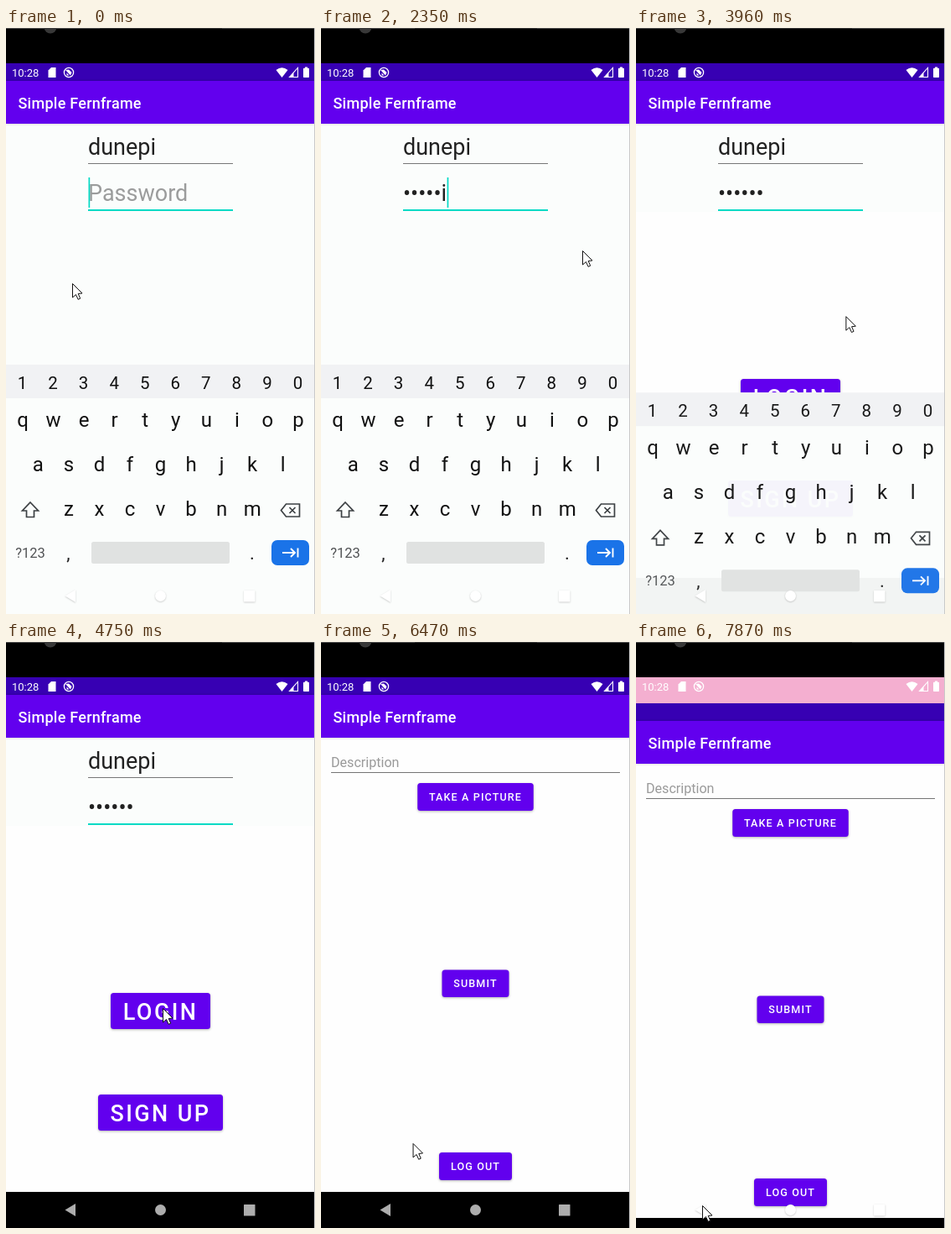
Recreate the animation shown at these times as an HTML page with a canvas. Size 369 by 698 pixels, loop 7.99 s.

```html
<!DOCTYPE html>
<html lang="en">
<head>
<meta charset="utf-8">
<title>Login demo</title>
<style>
html, body { margin: 0; width: 100%; height: 100%; overflow: hidden; background: #000; }
canvas { display: block; width: 369px; height: 698px; }
</style>
</head>
<body>
<canvas id="stage"></canvas>
<script>
const W = 369, H = 698, LOOP = 7990, STEP = 120;
const TOP = 42, BAR = 63, NAV = 655, MID_X = 184.5, MID_Y = 370;
const PURPLE = '#6200ee', DEEP = '#3700b3', TEAL = '#03dac5', PAPER = '#fefefe', INK = '#212121';
const USER = 'dunepi';
const FIELD_X = 98, FIELD_W = 173;
const KEY_GAP = 36.55, ROW_GAP = 53;
const HIDE_KEYBOARD = 3960, PRESS = 5000, OPEN = 5870, CLOSE = 7870;

const canvas = document.getElementById('stage');
const ctx = canvas.getContext('2d');
const ratio = window.devicePixelRatio || 1;
canvas.width = W * ratio;
canvas.height = H * ratio;

// Pointer strokes: each bends through a control point on its way to the next rest.
const home = [79, 304];
const strokes = [
  { start: 1870, end: 2350, bend: [170, 430], to: [312, 265] },
  { start: 2510, end: 2990, bend: [300, 620], to: [222, 213] },
  { start: 3540, end: 3820, bend: [227, 216], to: [232, 219] },
  { start: 3960, end: 4480, bend: [295, 580], to: [187, 436] },
  { start: 6110, end: 6590, bend: [213, 513], to: [53, 649] },
  { start: 6710, end: 7250, bend: [56, 705], to: [79, 671] }
];

// Stepped progress: already under way at start, complete at end.
function progress(t, start, end) {
  if (t < start) return 0;
  const done = Math.floor((t - start) / STEP) + 1;
  const total = Math.floor((end - start) / STEP) + 1;
  return Math.min(1, done / total);
}

function pointerAt(t) {
  let from = home;
  for (const { start, end, bend, to } of strokes) {
    const p = progress(t, start, end), q = 1 - p;
    if (p < 1) return from.map((v, i) => q * q * v + 2 * p * q * bend[i] + p * p * to[i]);
    from = to;
  }
  return from;
}

function keysTyped(t, start, count, interval) {
  return Math.max(0, Math.min(count, Math.floor((t - start) / interval) + 1));
}

function caretVisible(t) {
  const idle = Math.max(0, Math.min(t, 5240) - 1370);
  return Math.floor(idle / 482) % 2 === 0;
}

function rect(x, y, w, h, color, radius = 0) {
  ctx.fillStyle = color;
  ctx.beginPath();
  ctx.roundRect(x, y, w, h, radius);
  ctx.fill();
}

function disc(x, y, r, color) {
  ctx.fillStyle = color;
  ctx.beginPath();
  ctx.arc(x, y, r, 0, Math.PI * 2);
  ctx.fill();
}

function path(points, { fill, stroke, width = 1, close = true }) {
  ctx.beginPath();
  points.forEach(([x, y]) => ctx.lineTo(x, y));
  if (close) ctx.closePath();
  if (fill) { ctx.fillStyle = fill; ctx.fill(); }
  if (stroke) { ctx.strokeStyle = stroke; ctx.lineWidth = width; ctx.stroke(); }
}

function text(str, x, y, size, color, { weight = 400, spacing = 0, align = 'left' } = {}) {
  ctx.font = `${weight} ${size}px Roboto, sans-serif`;
  ctx.letterSpacing = spacing + 'px';
  ctx.textAlign = align;
  ctx.fillStyle = color;
  ctx.fillText(str, x, y);
  const { width } = ctx.measureText(str);
  ctx.letterSpacing = '0px';
  return width;
}

function group(draw) {
  ctx.save();
  draw();
  ctx.restore();
}

function clipped(x, y, w, h, draw) {
  group(() => {
    ctx.beginPath();
    ctx.roundRect(x, y, w, h, 0);
    ctx.clip();
    draw();
  });
}

function shadowed(alpha, blur, drop, draw) {
  group(() => {
    ctx.shadowColor = `rgba(0,0,0,${alpha})`;
    ctx.shadowBlur = blur;
    ctx.shadowOffsetY = drop;
    draw();
  });
}

function scaled(scale, draw) {
  group(() => {
    ctx.translate(MID_X, MID_Y);
    ctx.scale(scale, scale);
    ctx.translate(-MID_X, -MID_Y);
    draw();
  });
}

function button(label, y, w, h, size) {
  shadowed(.3, 3, 1, () => rect(MID_X - w / 2, y, w, h, PURPLE, 3.5));
  text(label, MID_X, y + h / 2 + size * .375, size, '#fff',
    { weight: 500, spacing: size * .0893, align: 'center' });
}

function appWindow(paper) {
  rect(0, TOP, W, NAV - TOP, paper);
  rect(0, TOP, W, BAR - TOP, DEEP);
  shadowed(.22, 3, 0, () => rect(0, BAR, W, 114 - BAR, PURPLE));
  text('Simple Fernframe', 14.5, 96, 18, '#fff', { weight: 500, spacing: .25 });
  rect(0, NAV, W, H - NAV + 10, '#000');
}

function passwordField(t) {
  const size = 27, baseline = 206;
  const count = keysTyped(t, 250, 2, STEP) + keysTyped(t, 880, 4, 160);
  const masked = t >= 2860 ? count : Math.max(0, count - 1);
  let x = FIELD_X;
  if (!count) text('Password', x, baseline, size, '#9b9c9c');
  x += text('•'.repeat(masked), x, baseline, size, INK);
  x += text(USER.slice(masked, count), x, baseline, size, INK);
  if (caretVisible(t)) rect(x + .5, 178, 1.7, 36, TEAL);
  rect(FIELD_X, 216, FIELD_W, 2, TEAL);
}

function loginScreen(t) {
  appWindow('#fbfdfc');
  if (t >= HIDE_KEYBOARD) rect(0, 219, W, NAV - 219, PAPER);
  text(USER, FIELD_X, 151, 27, INK);
  rect(FIELD_X, 161, FIELD_W, 1, '#777');
  passwordField(t);
  button('LOGIN', 418, 119, 43, 27);
  button('SIGN UP', 539, 149, 43, 27);

  const press = progress(t, PRESS, PRESS + 2 * STEP);
  if (press > 0 && press < 1) clipped(125, 418, 119, 43, () =>
    disc(187, 438, 100 * press, `rgba(255,255,255,${.35 * (1 - press)})`));
}

function postScreen() {
  const size = 12.56;
  appWindow(PAPER);
  text('Description', 12, 149, 16.1, '#9a9a9a');
  rect(12, 155, 345, 1, '#757575');
  button('TAKE A PICTURE', 168, 138.5, 33, size);
  button('SUBMIT', 390.5, 80, 32.5, size);
  button('LOG OUT', 608, 87, 33, size);
}

function keyRow(keys, x, baseline, size) {
  [...keys].forEach((key, i) =>
    text(key, x + i * KEY_GAP, baseline, size, '#111', { align: 'center' }));
}

function shiftKey(x, y) {
  const half = [[0, -9], [9.5, 1], [4.5, 1], [4.5, 8.5]];
  const mirrored = half.slice(1).reverse().map(([dx, dy]) => [-dx, dy]);
  path([...half, ...mirrored].map(([dx, dy]) => [x + dx, y + dy]),
    { stroke: '#3c4043', width: 1.7 });
}

function backspaceKey(x, y) {
  const line = { stroke: '#3c4043', width: 1.7 };
  path([[x - 12, y], [x - 6, y - 7.5], [x + 10, y - 7.5], [x + 10, y + 7.5], [x - 6, y + 7.5]], line);
  for (const slope of [1, -1]) path([[x - 2, y - 3.5 * slope], [x + 5, y + 3.5 * slope]], line);
}

function enterKey(x, y) {
  const line = { stroke: '#fff', width: 1.9, close: false };
  rect(x - 22.5, y - 15, 45, 30, '#1a73e8', 7);
  path([[x - 9.5, y], [x + 5.5, y]], line);
  path([[x + .5, y - 5], [x + 5.5, y], [x + .5, y + 5]], line);
  path([[x + 9, y - 5.5], [x + 9, y + 5.5]], line);
}

function keyboard() {
  rect(0, 401, W, H - 401, '#fbfdfc');
  rect(0, 401, W, 40, '#f1f2f4');
  keyRow('1234567890', 19.5, 430, 20.5);
  ['qwertyuiop', 'asdfghjkl', 'zxcvbnm'].forEach((keys, row) =>
    keyRow(keys, MID_X - (keys.length - 1) * KEY_GAP / 2, 475 + row * ROW_GAP, 24));
  text('?123', 29, 631, 16.5, '#505254', { align: 'center' });
  text(',', 74.5, 633, 22, '#222', { align: 'center' });
  text('.', 294, 633, 22, '#222', { align: 'center' });
  rect(102, 612, 165, 26, '#e0e2e1', 2.5);
  shiftKey(29, 574);
  backspaceKey(340.5, 574.5);
  enterKey(339.5, 625);
}

function navIcons(faint) {
  const color = faint ? '#fff' : '#adadad', y = 676.5;
  shadowed(faint ? .22 : 0, 2, .7, () => {
    path([[70.5, y], [83, y - 7.5], [83, y + 7.5]], { fill: color });
    disc(MID_X, y, 6.5, color);
    rect(284, y - 6.5, 13.5, 13.5, color, .5);
  });
}

function statusIcons() {
  const white = { fill: '#fff' };
  text('10:28', 7, 57.8, 13, '#fff');
  path([[54, 47], [59.5, 47], [59.5, 59], [50.5, 59], [50.5, 50.5]], white);

  ctx.strokeStyle = '#fff';
  ctx.lineWidth = 1.3;
  ctx.beginPath();
  ctx.arc(75, 53, 5.6, 0, Math.PI * 2);
  ctx.stroke();
  path([[71, 50], [75, 49.5], [78.5, 53], [77, 56.5]], white);
  path([[72.5, 53.5], [75.5, 56.5], [72.5, 56.5]], white);

  ctx.fillStyle = '#fff';
  ctx.beginPath();
  ctx.moveTo(329.5, 59);
  ctx.lineTo(322.5, 50);
  ctx.quadraticCurveTo(329.5, 44.5, 336.5, 50);
  ctx.fill();
  path([[348.5, 47.5], [348.5, 58.5], [338.5, 58.5]], { stroke: '#fff', width: 1.1 });
  path([[343.5, 53], [343.5, 58.5], [338.5, 58.5]], white);
  rect(357, 46.5, 3, 2, '#fff');
  rect(355, 47.7, 7, 11.3, '#fff', .8);
}

function pointer(x, y) {
  const outline = [[0, 0], [0, 16.5], [4, 13], [6.6, 18.8], [9.2, 17.7], [6.7, 12], [11.5, 11.5]];
  path(outline.map(([dx, dy]) => [x + dx + .5, y + dy + .5]), { fill: '#fff', stroke: '#111' });
}

function bezel() {
  rect(0, 0, W, TOP, '#000');
  rect(0, 0, W, 1, '#4a4a4a');
  rect(112, 0, 146, 1, '#333');
  disc(53, -1, 7.5, '#383838');
  rect(W - 1, 0, 1, H, '#c9c9c9');
}

function loginWithKeyboard(t) {
  loginScreen(t);
  const hide = progress(t, HIDE_KEYBOARD, HIDE_KEYBOARD + 2 * STEP);
  if (hide < 1) group(() => {
    ctx.globalAlpha = 1 - hide ** 3;
    ctx.translate(0, 300 * hide ** 2);
    keyboard();
  });
}

function openPostScreen(t) {
  const left = 1 - progress(t, OPEN, OPEN + 2 * STEP);
  if (left > 0) {
    scaled(1 + .05 * (1 - left ** 4.5), () => loginScreen(t));
    rect(0, TOP, W, H - TOP, 'rgba(0,0,0,.13)');
  }
  scaled(1 - .05 * left ** 2, postScreen);
}

function leaveApp() {
  const drop = 31;
  rect(0, TOP, W, H - TOP, '#f4afd0');
  group(() => {
    ctx.translate(0, drop);
    postScreen();
  });
  clipped(0, TOP, W, NAV + drop - TOP, () => navIcons(true));
}

function draw(t) {
  ctx.setTransform(ratio, 0, 0, ratio, 0, 0);
  rect(0, 0, W, H, '#000');
  clipped(0, TOP, W, H - TOP, () => {
    if (t < OPEN) loginWithKeyboard(t);
    else if (t < CLOSE) openPostScreen(t);
    else leaveApp();
  });
  if (t < CLOSE) navIcons(t < HIDE_KEYBOARD + STEP);
  statusIcons();
  pointer(...pointerAt(t));
  bezel();
}

const start = performance.now();
function tick() {
  draw((performance.now() - start) % LOOP);
  requestAnimationFrame(tick);
}
tick();
</script>
</body>
</html>
```
